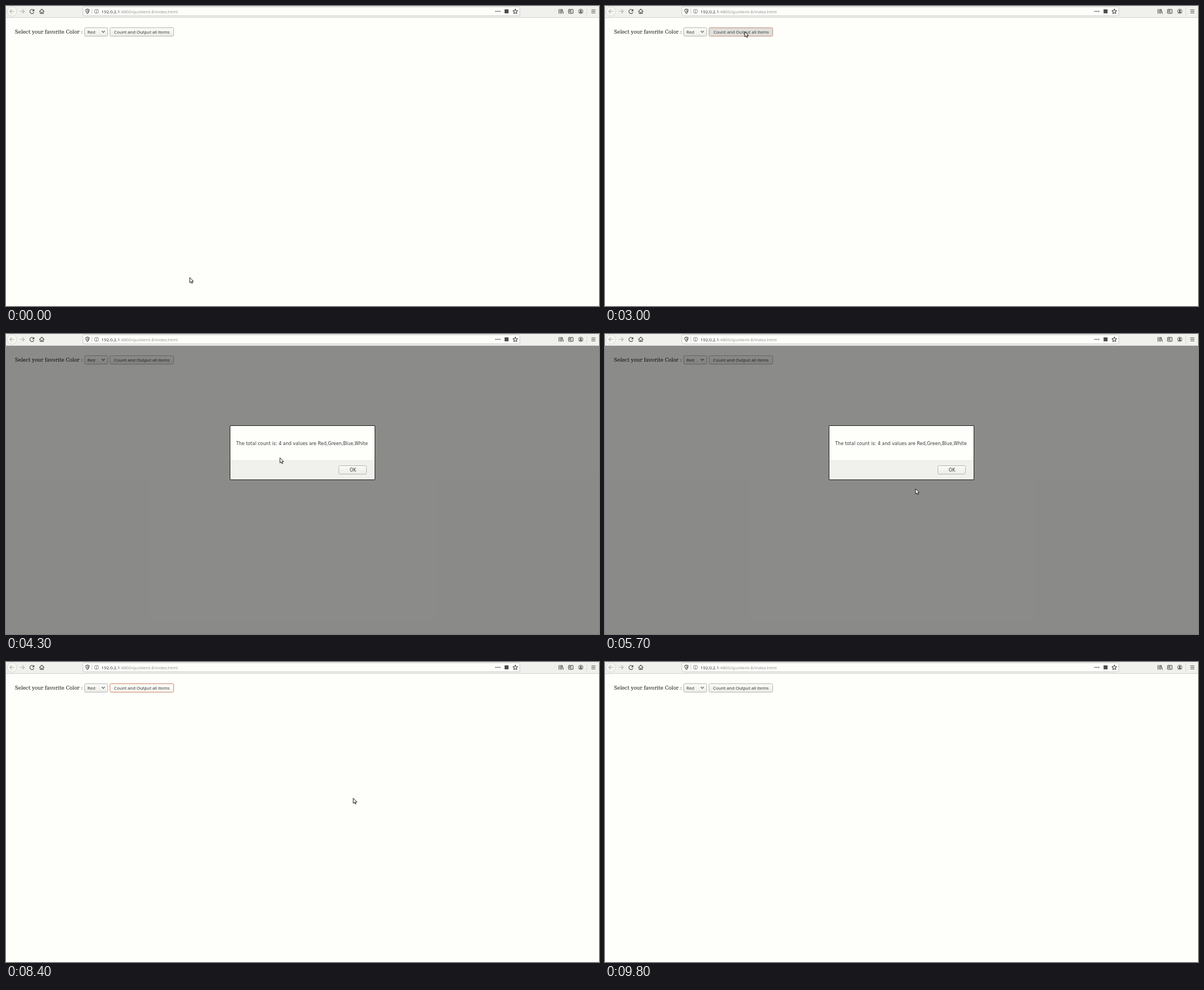
These frames come from a looping animation (1052x532 px, 10000 ms). An HTML page:

```html
<!DOCTYPE html>
<html lang="en">
<head>
<meta charset="utf-8">
<title>Count items</title>
<style>
  html, body { margin: 0; width: 100%; height: 100%; overflow: hidden; background: #fefffb; }
  svg { display: block; width: 1052px; height: 532px; }
  .ui { font: 7.75px "Noto Sans", "Open Sans", sans-serif; fill: #3c3c3a; }
  .alert { font: 8.05px "DejaVu Sans", sans-serif; fill: #3b3b39; }
  .label { font: 8.77px "DejaVu Serif", "Noto Serif", serif; fill: #111; }
  .mid { text-anchor: middle; }
  .icon { fill: none; stroke: #4b4b49; stroke-width: 1.1; stroke-linejoin: round; }
  .faint { stroke: #b3b4af; }
  .solid { fill: #4b4b49; stroke: none; }
</style>
</head>
<body>
<svg viewBox="0 0 1052 532">
  <defs>
    <linearGradient id="face" x2="0" y2="1">
      <stop stop-color="#fbfcf8"/><stop offset="1" stop-color="#ebece7"/>
    </linearGradient>
    <linearGradient id="lit" x2="0" y2="1">
      <stop stop-color="#fbfcf8"/><stop offset="1" stop-color="#f4f5f0"/>
    </linearGradient>
  </defs>

  <rect width="1052" height="532" fill="#fefffb"/>

  <g id="page">
    <text class="label" x="15.7" y="48.9">Select your favorite Color :</text>
    <rect x="139.5" y="38.5" width="41" height="15" rx="2" fill="url(#face)" stroke="#b5b6b1"/>
    <text class="ui" x="144.4" y="48.5">Red</text>
    <path class="icon" d="M170 44.2l2.6 2.6 2.6-2.6"/>
    <rect id="button" x="184.5" y="38.5" width="113" height="15" rx="2"/>
    <text id="caption" class="ui mid" x="241" y="48.5">Count and Output all items</text>
  </g>

  <g id="toolbar">
    <rect width="1052" height="20" fill="#f0f1ec"/>
    <path d="M0 20.5H1052" stroke="#d3d4cf"/>
    <circle cx="10.5" cy="9.5" r="8.6" fill="#f5f6f1" stroke="#d0d1cc" stroke-width=".8"/>
    <path class="icon faint" d="M14.8 9.5H6.8M10.3 6L6.8 9.5l3.5 3.5M24.5 9.5h8M29 6l3.5 3.5L29 13"/>
    <path class="icon" d="M49.4 8A3.7 3.7 0 1 0 49.6 10.8"/>
    <path class="solid" d="M50.2 5.2v4h-4z"/>
    <path class="icon" d="M59.2 9.8l4.3-4.3 4.3 4.3M60.6 9v4.3h5.8V9"/>
    <rect class="solid" x="62.6" y="10.2" width="1.8" height="3.2"/>

    <rect x="136.5" y="1.5" width="775" height="16" rx="2" fill="#fefffb" stroke="#c8c9c4"/>
    <path class="icon" d="M141.6 6.3l2.9-.9 2.9.9c0 3.5-.6 5.5-2.9 7.1-2.3-1.6-2.9-3.6-2.9-7.1z"/>
    <path class="solid" d="M144.5 7l1.5.5c0 2-.4 3-1.5 4z"/>
    <path d="M152.5 4V15" stroke="#d0d1cc"/>
    <circle class="icon" cx="160.5" cy="9.5" r="3.6" style="stroke:#777875;stroke-width:.9"/>
    <path class="icon" d="M160.5 8.8v3M160.5 7v1" style="stroke:#777875"/>
    <text class="ui" x="169.3" y="12.6">192.0.2.1<tspan fill="#969793">:4800/quotient-8/index.html</tspan></text>
    <g class="solid">
      <circle cx="869.3" cy="9.5" r="1.1"/><circle cx="872.6" cy="9.5" r="1.1"/><circle cx="875.9" cy="9.5" r="1.1"/>
      <rect x="884.5" y="6" width="7" height="7"/>
    </g>
    <path id="star" class="icon"/>

    <path class="icon" d="M981 5.5v8M983.5 5.5v8M985.6 5.5v8M986.5 5.7l2.3 7.8"/>
    <rect class="icon" x="998" y="6" width="8" height="7" rx="1"/>
    <path class="icon" d="M1002 6v7M999 8h2M999 10h2"/>
    <circle class="icon" cx="1019.7" cy="9.5" r="3.9" style="stroke-width:.9"/>
    <circle class="solid" cx="1019.7" cy="8.3" r="1.5"/>
    <path class="solid" d="M1017.2 12a2.5 2 0 0 1 5 0z"/>
    <path d="M1030.5 1V18" stroke="#dcddd8"/>
    <path class="icon" d="M1038.5 6.8h7M1038.5 9.5h7M1038.5 12.2h7"/>
  </g>

  <g id="dialog">
    <rect y="21" width="1052" height="511" fill="#000" fill-opacity=".455"/>
    <rect x="397.5" y="162.5" width="257" height="96" rx=".5" fill="#fefffb" stroke="#1c1c1a"/>
    <rect x="398" y="225" width="256" height="33" fill="#f0f1ec"/>
    <path d="M398 224.5H654" stroke="#e6e7e2"/>
    <text class="alert" x="408.2" y="197">The total count is: 4 and values are Red,Green,Blue,White</text>
    <rect x="590.5" y="233.5" width="49" height="15" rx="2" fill="url(#face)" stroke="#b5b6b1"/>
    <text class="alert mid" x="615.6" y="243.6">OK</text>
  </g>

  <path id="cursor" d="M.5.5V9.6L2.6 7.8l1.4 3 1.6-.7L4.3 7.2H7z" fill="#fff" stroke="#161616" stroke-width="1"/>
</svg>
<script>
  const LOOP = 10000, TICK = 100;
  const el = id => document.getElementById(id);

  // Pointer strokes: first tick (ms), number of ticks, end x, end y
  const home = [325.5, 481];
  const strokes = [
    [600, 2, 285, 316], [900, 1, 288, 304], [1300, 3, 260, 66],
    [1700, 2, 262, 48], [1900, 1, 263, 50], [2300, 2, 247.5, 45],
    [3700, 3, 417, 164], [4300, 1, 485.5, 219], [4400, 1, 489, 226],
    [4700, 6, 542.5, 273], [5700, 3, 573, 277], [6000, 4, 636, 248],
    [6800, 2, 615.5, 241], [8800, 2, 313, 65], [9100, 2, 288, 43]
  ];

  // Button looks: from (ms), fill, border, caption shift
  const plain = ["url(#face)", "#b5b6b1", 0];
  const looks = [
    [0, ...plain],
    [1800, "url(#lit)", "#b5b6b1", 0],
    [2900, "#e4e5e0", "#c98f7c", .6],
    [3000, "#dfe0db", "#c98f7c", .6],
    [3100, ...plain],
    [8400, "url(#lit)", "#cf8469", 0],
    [8800, "url(#face)", "#cf8469", 0],
    [9800, ...plain]
  ];

  function pointerAt(t) {
    let [x, y] = home;
    for (const [start, ticks, toX, toY] of strokes) {
      if (t < start) break;
      const k = Math.min(1, ((t - start) / TICK + 1) / ticks);
      const ease = k * k * (3 - 2 * k);
      x += (toX - x) * ease;
      y += (toY - y) * ease;
    }
    return [x, y];
  }

  function show(id, on) {
    el(id).style.display = on ? "" : "none";
  }

  function draw(ms) {
    const t = Math.floor(ms % LOOP / TICK) * TICK;
    const [, fill, border, shift] = looks.filter(look => look[0] <= t).pop();
    el("button").setAttribute("fill", fill);
    el("button").setAttribute("stroke", border);
    el("caption").setAttribute("transform", `translate(${shift} ${shift / 3})`);
    el("cursor").setAttribute("transform", `translate(${pointerAt(t)})`);
    show("cursor", t < 9800);
    show("dialog", t >= 3100 && t < 8400);
  }

  const star = Array.from({ length: 10 }, (_, i) => {
    const r = i % 2 ? 2.1 : 4.5, a = i * Math.PI / 5;
    return [903.5 + r * Math.sin(a), 9.8 - r * Math.cos(a)];
  });
  el("star").setAttribute("d", `M${star.join("L")}Z`);

  const begin = performance.now();
  function frame() {
    draw(performance.now() - begin);
    requestAnimationFrame(frame);
  }
  frame();
</script>
</body>
</html>
```
